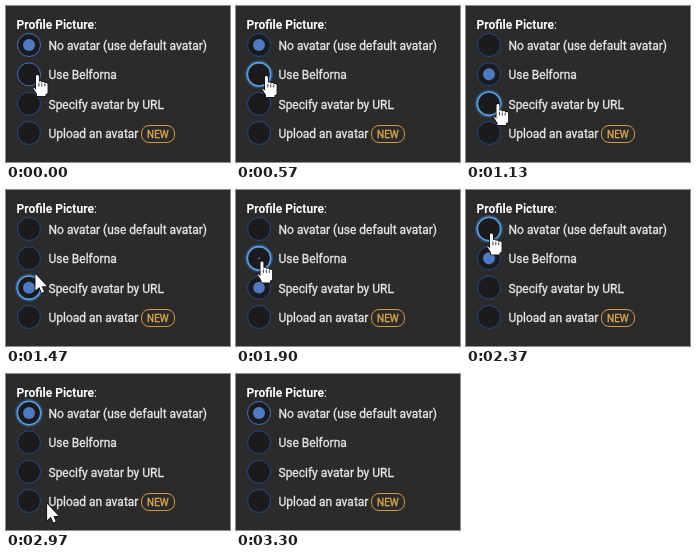
Animation of 224x156 px, one loop 3330 ms. Source, as an HTML page with a canvas:

```html
<!DOCTYPE html>
<html lang="en">
<head>
<meta charset="utf-8">
<title>Profile picture options</title>
<style>
  html, body { margin: 0; width: 100%; height: 100%; overflow: hidden; background: #2b2b2b; }
  svg, canvas { position: absolute; left: 0; top: 0; width: 224px; height: 156px; }
  text { font: 400 12px Roboto, Arial, sans-serif; fill: #e8e8e8; stroke: #e8e8e8; stroke-width: 0.3px; }
  .title { fill: #fff; stroke: none; }
  .title tspan { font-weight: 700; }
  .new { font-size: 10px; fill: #e0aa4c; stroke: #e0aa4c; }
</style>
</head>
<body>
<svg viewBox="0 0 224 156">
  <text class="title" x="10.5" y="22.5"><tspan>Profile Picture</tspan>:</text>
  <text x="42.5" y="44">No avatar (use default avatar)</text>
  <text x="42.5" y="73">Use Belforna</text>
  <text x="42.5" y="103">Specify avatar by URL</text>
  <text x="42.5" y="132">Upload an avatar</text>
  <rect x="135.5" y="119.5" width="33" height="17" rx="7.5" fill="none" stroke="#cf9a42"/>
  <text class="new" x="141" y="132">NEW</text>
</svg>
<canvas></canvas>
<script>
const LOOP = 3330, CX = 23, R = 12, BLUR = 3300, GROW = 170;
const rowY = i => 39 + i * 29.33;
const canvas = document.querySelector('canvas');
const ctx = canvas.getContext('2d');
const scale = Math.max(1, window.devicePixelRatio || 1);
canvas.width = 224 * scale;
canvas.height = 156 * scale;

const clicks = [
  { row: 1, down: 570, up: 620 },
  { row: 2, down: 1130, up: 1210 },
  { row: 1, down: 1770, up: 1885 },
  { row: 0, down: 2370, up: 2500 }
];
const home = { x: 32, y: 68.5 };
const moves = [
  { at: 70, for: 1, x: 31, y: 69.5 },
  { at: 700, for: 130, x: 28, y: 80 },
  { at: 830, for: 200, x: 32.5, y: 97.5 },
  { at: 1370, for: 200, x: 26.5, y: 71 },
  { at: 1960, for: 210, x: 23.5, y: 45 },
  { at: 2199, for: 1, x: 26, y: 43 },
  { at: 2700, for: 400, x: 46, y: 158 }
];

const arrow = new Path2D('M0 0V16.5L3.8 13 6.3 18.7 8.6 17.7 6.2 12.2H11.5Z');
const hand = new Path2D('M-5.5 12.5L-2 15V11H9.5V16L7.5 20V21.5H-1V19.5Z');
const creases = new Path2D();
for (let i = 0; i < 4; i++) {
  const x = -2 + 2.9 * i;
  hand.roundRect(x, i ? 6 + i * 0.8 : 0.5, 2.9, 11, 1.4);
  if (i) {
    creases.moveTo(x, 8 + i * 0.5);
    creases.lineTo(x, 12);
  }
}

const ease = v => {
  const k = Math.min(1, Math.max(0, v));
  return k * k * (3 - 2 * k);
};

function pointerAt(t) {
  let { x, y } = home;
  for (const m of moves) {
    const k = ease((t - m.at) / m.for);
    x += (m.x - x) * k;
    y += (m.y - y) * k;
  }
  return { x, y };
}

function stateAt(t) {
  const dots = [1, 0, 0, 0];
  let focus = -1, checked = 0;
  for (const { row, down, up } of clicks) {
    if (t >= down) focus = row;
    if (t >= up) {
      const k = ease((t - up) / GROW);
      dots[checked] = 1 - k;
      dots[row] = Math.max(k, 0.15);
      checked = row;
    }
  }
  if (t >= BLUR) focus = -1;
  return { dots, focus, checked };
}

function circle(y, r, fill, stroke, width = 1) {
  ctx.beginPath();
  ctx.arc(CX, y, r, 0, Math.PI * 2);
  if (fill) {
    ctx.fillStyle = fill;
    ctx.fill();
  }
  if (stroke) {
    ctx.lineWidth = width;
    ctx.strokeStyle = stroke;
    ctx.stroke();
  }
}

function radio(y, dot, focused, lit) {
  circle(y, R - 0.5, '#1b1b1d', lit ? '#4673c2' : '#25488a');
  if (focused) {
    circle(y, R + 1, null, 'rgba(55, 115, 190, 0.45)', 2);
    circle(y, R - 0.3, null, '#5a9fdc', 1.6);
  }
  if (dot > 0) circle(y, 6 * dot, '#5079c4');
}

function drawPointer(p, over) {
  const shape = over ? hand : arrow;
  ctx.save();
  ctx.translate(p.x, p.y);
  ctx.lineJoin = 'round';
  ctx.strokeStyle = '#111';
  ctx.fillStyle = '#fff';
  ctx.lineWidth = 1.6;
  ctx.stroke(shape);
  ctx.fill(shape);
  ctx.lineWidth = 0.8;
  if (over) ctx.stroke(creases);
  ctx.restore();
}

function draw(t) {
  ctx.setTransform(scale, 0, 0, scale, 0, 0);
  ctx.clearRect(0, 0, 224, 156);
  const p = pointerAt(t), { dots, focus, checked } = stateAt(t);
  const hover = dots.findIndex((_, i) => Math.hypot(p.x - CX, p.y - rowY(i)) < R);
  dots.forEach((dot, i) => {
    const lit = i === hover || (i === checked && focus < 0);
    radio(rowY(i), dot, i === focus, lit);
  });
  if (t < 3070) drawPointer(p, hover >= 0);
}

const start = performance.now();
function tick() {
  draw((performance.now() - start) % LOOP);
  requestAnimationFrame(tick);
}
tick();
</script>
</body>
</html>
```
